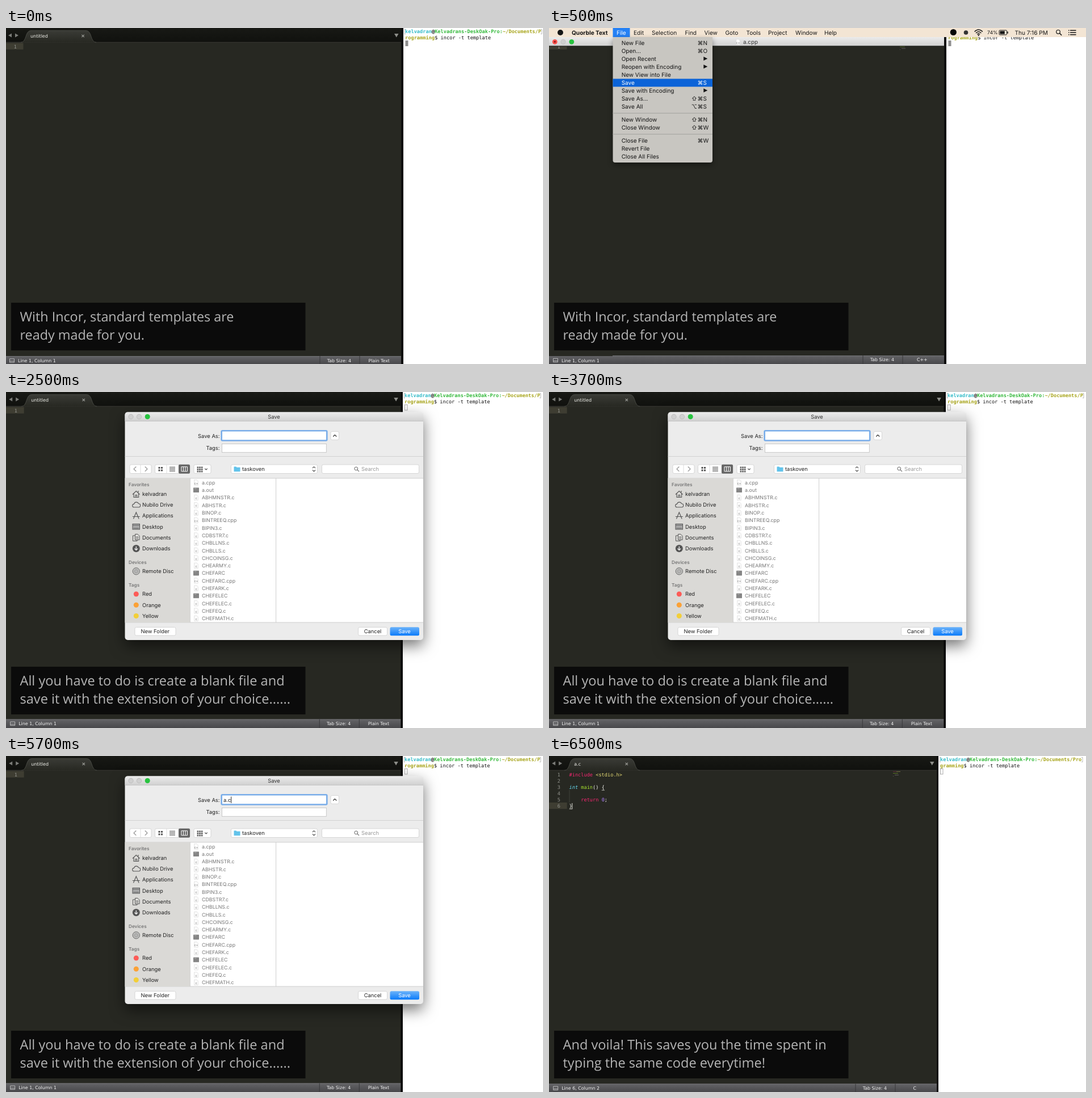
An HTML page for the animation above (8000 ms loop, 946 px wide and 592 px high).

```html
<!DOCTYPE html>
<html lang="en">
<head>
<meta charset="utf-8">
<title>Template demo</title>
<style>
html, body { margin: 0; width: 100%; height: 100%; overflow: hidden; background: #fff; }
svg { display: block; width: 946px; height: 592px; }
text { white-space: pre; text-rendering: geometricPrecision; }
.mono { font-family: "DejaVu Sans Mono", monospace; }
.ui { font-family: Inter, sans-serif; }
.bar { font-family: "DejaVu Sans", sans-serif; }
.cap { font-family: "Open Sans", sans-serif; }
.menu { filter: drop-shadow(0 4px 5px rgba(0,0,0,.4)); }
.dialog { filter: drop-shadow(0 10px 13px rgba(0,0,0,.55)); }
</style>
</head>
<body>
<svg id="stage" viewBox="0 0 946 592"></svg>
<script>
const rect = (x, y, w, h, fill, more = '') =>
  `<rect x="${x}" y="${y}" width="${w}" height="${h}" fill="${fill}" ${more}/>`;
const dot = (x, y, r, fill, more = '') => `<circle cx="${x}" cy="${y}" r="${r}" fill="${fill}" ${more}/>`;
const line = (d, color, width = 1, fill = 'none') =>
  `<path d="${d}" stroke="${color}" stroke-width="${width}" fill="${fill}"/>`;
const shape = (d, fill) => `<path d="${d}" fill="${fill}"/>`;
const text = (font, size, s, x, y, fill, more = '') =>
  `<text class="${font}" font-size="${size}" x="${x}" y="${y}" fill="${fill}" ${more}>${s}</text>`;
const span = (s, fill, more = '') => `<tspan fill="${fill}" ${more}>${s}</tspan>`;
const grad = (id, a, b) =>
  `<linearGradient id="${id}" x2="0" y2="1"><stop stop-color="${a}"/><stop offset="1" stop-color="${b}"/></linearGradient>`;
const END = 'text-anchor="end"', MID = 'text-anchor="middle"', BOLD = 'font-weight="700"';

const defs = `<defs>${grad('strip', '#181915', '#10110e')}${grad('tab', '#3a3b36', '#272822')}
${grad('status', '#646467', '#48484b')}${grad('title', '#ebebeb', '#d1d1d1')}
${grad('blue', '#6cb3fa', '#0b7bfa')}</defs>`;

function caption(a, b, size) {
  return rect(9, 484, 518.5, 84, '#0b0b0b') +
    text('cap', size, a, 24.5, 517, '#b5b5b5') + text('cap', size, b, 24.5, 549, '#b5b5b5');
}

function terminal(x, size, head, tail, edge, block) {
  const left = x - 3;
  return rect(left, 0, 946 - left, 592, '#fff') +
    text('mono', size, span('kelvadran', '#35bcc9') + span('@', '#111') +
      span('Kelvadrans-DeskOak-Pro:', '#35b93c') + span('~/Documents/' + head, '#a8a51c'), x, 9.3, '#111', BOLD) +
    text('mono', size, span(tail, '#a8a51c', BOLD) + span('$ incor -t template', '#111'), x, 19.8, '#111') +
    line(`M${x + 1} 2.5h-2v8h2M${edge - 2} 2.5h2v8h-2`, '#aaa', .8) +
    (block ? rect(x + .5, 22, 5, 10, '#8f8f8f')
           : rect(x + .5, 22.5, 4.5, 9.5, 'none', 'stroke="#999" stroke-width=".8"'));
}

function statusBar(o) {
  const y = o.barY, base = o.textY + 3, put = (s, x, b = base) => text('bar', 7.9, s, x, b, '#f4f4f4');
  return rect(0, y, o.right, 592 - y, 'url(#status)') + line(`M0 ${y + .5}H${o.right}`, '#77777a', .8) +
    line(`M${o.x + 6.5} ${o.textY - 3.2}h8v6.4h-8zM${o.x + 6.5} ${o.textY + 1}h8`, '#c4c4c6', .9) +
    put(o.place, o.x + 21) + put('Tab Size: 4', o.right - 130.3, o.rightY || base) +
    put(o.syntax, o.syntaxX, o.rightY || base) +
    line(`M${o.right - 143} ${y}V592M${o.right - 73} ${y}V592`, '#38383b', 1);
}

function editor(o) {
  const x = o.x, r = o.right, row = o.row || 0;
  return rect(0, 0, r + 4, 592, '#0b0b0b') + rect(0, 0, r, 592, '#272822') +
    rect(0, 0, r, 25, 'url(#strip)') + line(`M0 25.2H${r}`, '#3b3c37', .9) +
    line(`M${x + 26} 25.4C${x + 37} 25 ${x + 33} 4.5 ${x + 44} 4.5H${x + 141}C${x + 152} 4.5 ${x + 148} 25 ${x + 159} 25.4`,
      '#50514b', .8, 'url(#tab)') +
    shape(`M${x + 10} 9.5v7l-6-3.5zM${x + 16} 9.5v7l6-3.5z`, '#7b7c78') +
    shape(`M${r - 12} 10h7.5l-3.7 6.5z`, '#8d8e89') +
    line(`M${x + 133.4} 11.8l4.4 4.4m0-4.4l-4.4 4.4`, '#a0a19c', 1.2) +
    text('bar', 8, o.name, x + 43, o.tabY + 3, '#f0f0ea') +
    rect(0, 26.5 + row * 11.1, x + 30.5, 11.3, '#3e3d32') + statusBar(o);
}

const lineNo = (n, x) => text('mono', 8.63, n, x, 35.5 + (n - 1) * 11.1, '#90918b', END);

function code() {
  const put = (n, s) => text('mono', 8.63, s, 35.5, 35.5 + (n - 1) * 11.1, '#f8f8f2');
  const pink = '#f92672';
  return [1, 2, 3, 4, 5, 6].map(n => lineNo(n, 20)).join('') +
    put(1, span('#include ', pink) + span('&lt;stdio.h&gt;', '#e6db74')) +
    put(3, span('int ', '#66d9ef', 'font-style="italic"') + span('main', '#a6e22e') + '() {') +
    put(5, span('    return ', pink) + span('0', '#ae81ff') + ';') + put(6, '}') +
    line('M92.8 60.3h5M35.8 93.3h5', '#d8d8d0', .8) + line('M36 60V82', '#46473f', .8) +
    line('M40.8 83V93.5', '#f8f8f0', .9) + minimap(606, 27.5);
}

const minimap = (x, y) => `<g opacity=".5">` + line(`M${x} ${y}h6`, '#b0305c', .8) + line(`M${x + 6} ${y}h7`, '#e6db74', .8) +
  line(`M${x} ${y + 3}h9`, '#a6e22e', .8) + line(`M${x + 3} ${y + 6}h7M${x} ${y + 8}h1`, '#b0a8b0', .8) + '</g>';

function menuBar() {
  const ink = '#161616', put = (s, x, fill = ink, more = '') => text('ui', 10.1, s, x, 11.7, fill, more);
  const names = [['Edit', 149], ['Selection', 181], ['Find', 239.5], ['View', 273.5], ['Goto', 310.5], ['Tools', 347.5],
    ['Project', 386], ['Window', 434], ['Help', 485]];
  return rect(0, 0, 946, 16, '#f3e5d4') + dot(20, 8, 5, ink) + put('Quorble Text', 40, ink, BOLD) +
    rect(112.5, 0, 30, 16, '#2581f5') + put('File', 119, '#fff') + names.map(n => put(...n)).join('') +
    dot(712.3, 7.5, 5.6, '#050505') + dot(734.5, 8, 3.8, '#333') +
    line('M749.6 6.4Q756.7-.6 763.8 6.4M752 8.9Q756.7 4.3 761.4 8.9M754.3 11.2Q756.7 9 759.1 11.2', ink, 1.4) + dot(756.7, 12.7, 1.2, ink) +
    text('ui', 8.7, '74%', 772, 11.3, ink) +
    rect(793, 4, 13.5, 8, 'none', 'rx="1.3" stroke="#161616"') + rect(794.4, 5.4, 8.3, 5.2, ink) + rect(807.4, 6.3, 1.4, 3.4, ink) +
    put('Thu 7:16 PM', 820.5) + dot(897, 6.8, 3.3, 'none', 'stroke="#161616" stroke-width="1.2"') +
    line('M899.5 9.3l3.6 3.6', ink, 1.5) + line('M918 4.2h10.5M918 8h10.5M918 11.8h10.5M915 4.2h1.5M915 8h1.5M915 11.8h1.5', ink, 1.4);
}

function fileMenu() {
  const items = [['New File', 26, '⌘N'], ['Open...', 40, '⌘O'], ['Open Recent', 54, '>'], ['Reopen with Encoding', 68, '>'],
    ['New View into File', 82], ['Save', 96, '⌘S'], ['Save with Encoding', 110, '>'], ['Save As...', 124, '⌘S', '⇧'],
    ['Save All', 138, '⌘S', '⌥'], ['New Window', 161, '⌘N', '⇧'], ['Close Window', 175, '⌘W', '⇧'],
    ['Close File', 198, '⌘W'], ['Revert File', 212], ['Close All Files', 226]];
  const row = ([name, y, key, mod = '']) => {
    const fill = name == 'Save' ? '#fff' : '#141414', put = (s, x, more) => text('ui', 10, s, x, y + 3.6, fill, more);
    return put(name, 127.7) + (key == '>' ? shape(`M272.3 ${y - 3.5}v7l7-3.5z`, fill)
      : key ? put(key, 261.5) + put(mod, 261, END) : '');
  };
  return `<g class="menu">${shape('M112.5 16H288V233q0 4-4 4H116.5q-4 0-4-4z', '#c8c6c1')}</g>` +
    rect(112.5, 89.5, 175.5, 14, '#0b63d8') + line('M112.5 150.2H288M112.5 187.2H288', '#aaa9a5', 1.2) + items.map(row).join('');
}

function saving() {
  return editor({ x: 1, right: 696, barY: 577, textY: 585.5, rightY: 587.3, place: 'Line 1, Column 1', syntax: 'C++',
      syntaxX: 648, name: '', tabY: 14 }) +
    rect(0, 577, 112, 1, '#272822') + lineNo(1, 20) + minimap(618, 30) +
    terminal(703, 8.67, 'P', 'rogramming', 944, true) +
    rect(0, 16, 696, 15.7, 'url(#title)') + line('M0 32H696', '#1b1c18', 1) +
    dot(10.3, 24.3, 4.4, '#f9504a') + dot(10.3, 24.3, 1.5, '#7d1513') + dot(25, 24.3, 4.2, '#cfcfcf', 'stroke="#bbb" stroke-width=".6"') +
    dot(39.8, 24.3, 4.4, '#27c33f') + page(333, 24.5, '.cpp') + text('ui', 9.8, 'a.cpp', 342, 28, '#333') +
    menuBar() + fileMenu();
}

function page(x, y, name) {
  if (!/\.c/.test(name)) return rect(x - 5, y - 4.3, 10, 8.6, '#858585', 'rx=".6"') + line(`M${x - 3.5} ${y - 2.5}h4`, '#b9b9b9', .7);
  return line(`M${x - 3.3} ${y - 4.7}h4.6l2 2v7.4h-6.6z`, '#d2d2d2', .6, '#fcfcfc') +
    text('ui', 5.6, /cpp/.test(name) ? 'c+' : 'c', x, y + 3, '#777', MID);
}

function sidebar() {
  const ink = '#555', head = (s, y) => text('ui', 8.2, s, 216, y + 3, '#777', 'font-weight="600"');
  const put = (s, y) => text('ui', 9.4, s, 240, y + 3.4, '#222');
  const places = [['kelvadran', 180], ['Nubilo Drive', 199], ['Applications', 218], ['Desktop', 237.3], ['Documents', 256.6],
    ['Downloads', 276], ['Remote Disc', 316], ['Red', 356], ['Orange', 375.3], ['Yellow', 394.5]];
  return rect(209.5, 152, 114.5, 254, '#dad9d6') + head('Favorites', 163) + head('Devices', 299.5) + head('Tags', 339.5) +
    places.map(p => put(...p)).join('') +
    line('M223 180.5l6.3-6 6.3 6M225 179v6.5h8.6V179M228 185.5v-4h2.6v4M233 177v-3', ink, 1.1) +
    line('M225.5 203a2.8 2.8 0 0 1 0-5.6a4.2 4.2 0 0 1 8-.6a3.1 3.1 0 0 1 .3 6.2z', ink, 1.1) +
    line('M224.5 223.5l4.8-11.5 4.8 11.5M222.8 219.5h13', ink, 1.2) +
    rect(223, 232.5, 12.5, 9.5, '#aaa', 'stroke="#555"') + line('M223 235h12.5M224.5 240h9.5', ink, .9) +
    line('M227.5 250.5h4.5l3 3v7h-7.5zM227 253h-3.5v9.5h7.5v-2M229 255.5h4M229 258h4', ink, 1) +
    dot(229.3, 275.7, 6.5, ink) + line('M229.3 272v6.5m-2.8-2.8l2.8 2.8 2.8-2.8', '#eee', 1.3) +
    dot(229.3, 315.8, 6.1, '#c4c4c2', 'stroke="#666"') + dot(229.3, 315.8, 3.4, 'none', 'stroke="#888" stroke-width=".8"') + dot(229.3, 315.8, 1.4, '#eee', 'stroke="#666" stroke-width=".7"') +
    [['#fc5b57', 356], ['#fba136', 375.3], ['#f2cf39', 394.5]].map(([c, y]) => dot(229.3, y, 4.5, c)).join('');
}

const files = ('a.cpp a.out ABHMNSTR.c ABHSTR.c BINOP.c BINTREEQ.cpp BIPIN3.c CDBSTR7.c CHBLLNS.c CHBLLS.c CHCOINSG.c ' +
  'CHEARMY.c CHEFARC CHEFARC.cpp CHEFARK.c CHEFELEC CHEFELEC.c CHEFEQ.c CHEFMATH.c').split(' ');

function dialog() {
  const ink = '#222', put = (s, x, y, fill = ink, more = '') => text('ui', 9.4, s, x, y + 3.4, fill, more);
  const button = (x, y, w, h, fill = '#fff') => rect(x, y, w, h, fill, 'rx="2.5" stroke="#cfcfcf" stroke-width=".8"');
  const grid = (x, y, nx, ny, s, step, c) => Array.from({ length: nx * ny }, (_, i) =>
    rect(x + i % nx * step, y + Math.floor(i / nx) * step, s, s, c)).join('');
  return `<g class="dialog">${rect(209.5, 35.5, 525.5, 401.5, '#ececec', 'rx="5"')}</g>` +
    shape('M209.5 51V40.5q0-5 5-5H730q5 0 5 5V51z', 'url(#title)') + line('M209.5 51.3H735', '#b9b9b9', .8) +
    [220, 234.5].map(x => dot(x, 43.5, 4.2, '#d0d0d0', 'stroke="#b5b5b5" stroke-width=".7"')).join('') + dot(249.2, 43.5, 4.5, '#27c33f') +
    put('Save', 472, 43.8, '#333', MID) + put('Save As:', 376.5, 77.3, ink, END) + put('Tags:', 376.5, 99, ink, END) +
    rect(379.7, 68.2, 185.6, 17.3, '#fff', 'rx="1.5" stroke="#79ade9" stroke-width="2.6"') +
    rect(380.5, 91.3, 183.8, 15, '#fff', 'stroke="#bdbdbd" stroke-width=".8"') +
    button(572, 69.5, 14.5, 14.8) + line('M576.3 78.5l3-3 3 3', '#333', 1.2) + line('M209.5 113.5H735', '#cfcfcf', .9) +
    button(218, 128, 38, 15.5) + line('M237 128v15.5', '#d5d5d5', .8) +
    line('M229.3 131.5l-4.2 4.2 4.2 4.2M244.8 131.5l4.2 4.2-4.2 4.2', '#8a8a8a', 1.1) +
    button(262.5, 128, 61.5, 15.5) + line('M283 128v15.5', '#d5d5d5', .8) + rect(304, 127.8, 20, 16, '#666', 'rx="2"') +
    grid(268.5, 132, 2, 2, 3, 4.5, '#555') + line('M288 132.3h10M288 134.7h10M288 137h10M288 139.4h10', '#555', 1) +
    line('M309 131.8h10.5v8H309zM312.5 131.8v8M316 131.8v8', '#fff', 1) +
    button(331, 128, 30, 15.5) + grid(336.5, 131.5, 3, 3, 2.8, 3.6, '#666') + line('M350.3 134.8l2.2 2.2 2.2-2.2', '#444', 1.1) +
    button(396.5, 128, 152, 15.5) + shape('M401.5 131.5h4l1 1.3h6v7.5h-11z', '#62c3ea') + put('taskoven', 416, 135.8) +
    line('M540 134.2l2.5-2.5 2.5 2.5M540 137.4l2.5 2.5 2.5-2.5', '#444', 1.1) +
    button(556.5, 128, 171, 15.5) + dot(616.8, 135, 2.9, 'none', 'stroke="#666"') + line('M619 137.2l3 3', '#666', 1.1) + put('Search', 626, 135.8, '#999') +
    rect(324, 152, 411, 254, '#fff') + line('M209.5 152H735M209.5 406H735M324.4 152V406M475.6 152V406', '#c9c9c9', .9) + sidebar() +
    files.map((f, i) => page(335, 159.5 + i * 13.3, f) + text('ui', 8.8, f, 345, 162.8 + i * 13.3, '#777')).join('') +
    button(227, 414.5, 72, 14.5) + put('New Folder', 262.7, 421.7, ink, MID) +
    button(620.5, 414.5, 51, 14.5) + put('Cancel', 646, 421.7, ink, MID) +
    rect(676.5, 414.3, 51.5, 15, 'url(#blue)', 'rx="2.5"') + put('Save', 702, 421.7, '#fff', MID);
}

const scenes = [
  { from: 0, to: 500, body: editor({ x: 0, right: 696, barY: 578, textY: 586, place: 'Line 1, Column 1', syntax: 'Plain Text',
      syntaxX: 638.5, name: 'untitled', tabY: 13.8 }) + lineNo(1, 19) + terminal(703, 8.67, 'P', 'rogramming', 944, true) },
  { from: 500, to: 2500, body: saving() },
  { from: 0, to: 2500, body: caption('With Incor, standard templates are', 'ready made for you.', 23.35) },
  { from: 2500, to: 6500, body: editor({ x: 1.2, right: 695.3, barY: 576.5, textY: 584.3, place: 'Line 1, Column 1', syntax: 'Plain Text',
      syntaxX: 637.7, name: 'untitled', tabY: 13.6 }) + lineNo(1, 20) + terminal(702, 8.64, 'P', 'rogramming', 942, false) + dialog() +
      caption('All you have to do is create a blank file and', 'save it with the extension of your choice......', 23.55) },
  { from: 4500, to: 6500, body: text('ui', 9.4, 'a.c', 383, 80.7, '#222') + line('M396.7 71.5V83', '#111', .9) },
  { from: 6500, to: 8000, body: editor({ x: 1.2, right: 683, barY: 577.5, textY: 585.3, place: 'Line 6, Column 2', syntax: 'C',
      syntaxX: 641.5, name: 'a.c', tabY: 14.3, row: 5 }) + code() + terminal(689, 8.63, 'Pro', 'gramming', 940, false) +
      caption('And voila! This saves you the time spent in', 'typing the same code everytime!', 23.6) }
];

const stage = document.getElementById('stage');
stage.innerHTML = defs + scenes.map(s => `<g class="scene">${s.body}</g>`).join('');
const groups = stage.querySelectorAll('.scene');

function draw() {
  const t = performance.now() % 8000;
  scenes.forEach((s, i) => groups[i].style.display = t >= s.from && t < s.to ? '' : 'none');
  requestAnimationFrame(draw);
}
draw();
</script>
</body>
</html>
```
